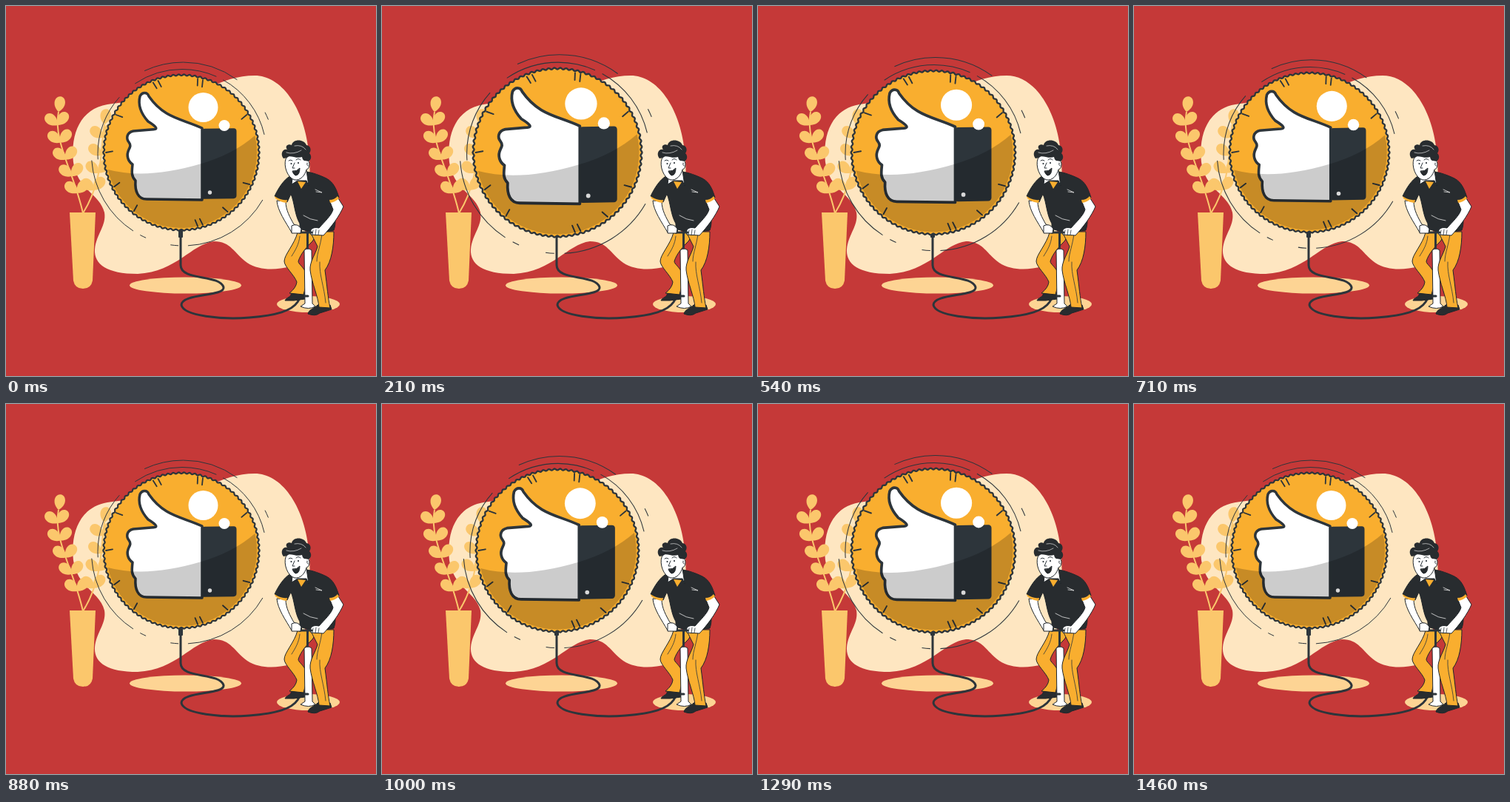
An HTML page that plays this animation: 500x500 px, repeating every 1500 ms.

```html
<!DOCTYPE html>
<html lang="en">
<head>
<meta charset="utf-8">
<title>Inflating balloon</title>
<style>
  html, body { margin: 0; width: 100%; height: 100%; overflow: hidden; background: #c53938; }
  svg { display: block; width: 100vw; height: 100vh; }
  .ink { fill: none; stroke: #2d353b; stroke-linecap: round; stroke-linejoin: round; }
  .ring { fill: none; stroke: #2d353b; }
  .stem { fill: none; stroke: #fbc76c; stroke-width: 2; }
  .part { stroke: #20262a; stroke-linejoin: round; }
  .white { fill: #fff; }
  .dark { fill: #282c2f; }
  .gold { fill: #f9ae2f; }
</style>
</head>
<body>
<svg viewBox="0 0 500 500">
  <path fill="#fee6c1" d="M336 94C372 94 402 136 409 195C414 250 409 325 384 352C365 357 343 358 326 347C308 334 304 318 281 318C250 322 231 359 178 362C136 362 119 349 120 329C122 308 136 297 133 279C127 254 96 248 91 211C87 172 101 139 137 133C181 126 239 129 278 109C294 101 313 94 336 94Z"/>

  <g id="plant" fill="#fbc76c">
    <path d="M86 279H121L117 371Q115 382 104 382Q93 382 91 371Z"/>
    <path class="stem" data-pairs="5" d="M71 143C63 182 92 225 104 280"/>
    <path class="stem" data-pairs="4" d="M133 160C128 190 132 235 104 280"/>
  </g>
  <ellipse cx="242.5" cy="377.5" rx="75.5" ry="11" fill="#fdd494"/>
  <ellipse cx="408.5" cy="403" rx="42.5" ry="11" fill="#fdd494"/>

  <path class="ink" stroke-width="3" d="M236 307V350C236 372 288 362 294 380C296 393 237 388 237 404C240 419 292 424 329 421C366 418 386 412 394 400C399 391 401 392 408 392"/>
  <rect x="233" y="303" width="6" height="10" rx="1" fill="#2d353b"/>

  <g id="balloon">
    <circle class="ring" cx="239.5" cy="200" r="124" pathLength="360" stroke-dasharray="0 30 57 6 5 16 4 5 53 69 61 27 5 22"/>
    <circle class="ring" cx="238" cy="199.5" r="114" pathLength="360" stroke-dasharray="0 176 46 14 58 5 48 13"/>
    <path id="coin" fill="#f9ae2f" stroke="#2d353b" stroke-width="2.2"/>
    <path id="ticks" class="ink" stroke-width="1.8"/>
    <path class="ink" style="fill:#fff" stroke-width="3.5" d="M265 165C237 152 214 152 193 122C191 116 184 116 181 122C178 134 183 146 192 156C205 164 206 167 196 167L172 169C163 171 162 179 166 184C169 188 168 190 166 194C162 202 165 210 171 214C170 224 169 230 175 236C174 250 178 261 190 261L265 262Z"/>
    <rect x="265.5" y="167" width="45" height="93" rx="3" transform="skewY(-1) translate(0 4.5)" fill="#2d353b" stroke="#2d353b" stroke-width="2"/>
    <path id="shade" opacity=".2"/>
    <circle cx="275.5" cy="252" r="2.7" fill="#d8d8d8"/>
    <circle cx="266.5" cy="137" r="20" fill="#fff"/>
    <circle cx="295" cy="161.5" r="7.5" fill="#fff"/>
  </g>

  <g id="legs">
    <path class="part dark" d="M385 388C387 393 378 394 377 398H389L404 396V388Z"/>
    <path class="part gold" d="M394 306C390 322 376 336 376 345C376 352 390 364 393 373Q392 381 383 388L402 390C405 378 408 370 406 362C402 352 395 349 395 345C398 335 406 326 414 318L422 306Z"/>
    <path class="part white" d="M403 330Q408 326 413 330L414 402L418 406Q409 411 398 406L404 402Z"/>
    <path class="ink" stroke-width="3" d="M407.5 305V327M404 392H408"/>
    <path class="part dark" d="M421 404C418 408 409 410 408 416Q418 420 424 415L440 410L438 404Z"/>
    <path class="part gold" d="M411 305H443C443 325 440 345 431 357C434 379 435 394 438 408L423 407C422 393 413 374 411 357C410 346 418 336 421 325Z"/>
    <path class="ink" stroke-width=".8" d="M427 307C426 321 420 334 420 345M424 346C423 363 430 379 432 401M397 311C396 322 391 330 386 338"/>
  </g>

  <g id="torso">
    <path class="part white" d="M366 263C367 277 378 292 386 306L399 307L400 300L389 295C384 286 378 276 378 264Z"/>
    <path class="part dark" d="M388 228C378 231 369 244 363 257Q371 264 380 265L385 254C390 266 390 282 397 294L397 301C413 307 429 306 443 303C448 289 443 275 438 265Q445 264 450 259C447 249 443 238 433 233C425 229 414 225 406 224Z"/>
    <path class="part white" d="M438 265L442 275C440 283 430 292 423 300C414 298 410 302 412 309L429 310C441 297 451 283 456 271L449 260Z"/>
    <path class="gold" d="M363 257Q371 263 380 262L379 266Q370 265 364 260ZM437 262Q444 262 448 257L450 260Q445 265 438 266Z"/>
    <path class="ink" style="stroke:#e8e8e8" stroke-width=".8" d="M418 248L427 252L419 251M402 283Q411 289 421 290"/>
    <path class="part white" d="M388 225L386 241L394 236L406 236L409 243L406 222Z"/>
    <path class="gold" d="M394 237L399 247L405 238Z"/>
    <path class="ink" stroke-width="3" d="M397 306H413"/>
    <path class="part white" d="M386 297Q394 293 399 301L398 307H386Z"/>
    <path class="ink" stroke-width=".8" d="M415 303L414 309M419 302L418 310M423 303L422 309"/>
  </g>

  <g id="head">
    <path class="part white" d="M378 207C375 216 380 232 390 235C398 236 404 229 406 221Q410 220 410 213Q409 207 405 209L402 198L382 199Z"/>
    <path class="dark" d="M375 206C370 200 374 192 380 194C376 189 382 186 386 188C388 179 403 180 406 188C412 189 413 195 410 199C414 203 412 208 409 210L405 209Q401 210 400 204C392 207 383 200 380 205Z"/>
    <path class="ink" style="stroke:#fff" stroke-width=".6" d="M379 198Q389 201 399 195M390 189Q400 187 405 194"/>
    <path class="ink" stroke-width="1" d="M382 209Q384 207 387 209M392 208Q395 205 398 208M390 212L387 219L390 219M407 212Q406 215 408 216"/>
    <path class="ink" stroke-width="2.2" d="M385.500 213v.1M395 212v.1"/>
    <path class="part dark" d="M387 223Q393 224 397 219Q397 229 391 229Q388 227 387 223Z"/>
  </g>
</svg>
<script>
const CX = 237, CY = 198, LOOP = 1500, FPS = 24;
const $ = id => document.getElementById(id);
const at = (r, deg) => {
  const a = deg * Math.PI / 180;
  return (CX + r * Math.cos(a)).toFixed(2) + ' ' + (CY + r * Math.sin(a)).toFixed(2);
};

// Scalloped rim
const SCALLOPS = 90;
const rim = Array.from({ length: SCALLOPS * 8 }, (_, i) =>
  at(104.8 + 0.9 * Math.cos(i * Math.PI / 4), i * 45 / SCALLOPS));
$('coin').setAttribute('d', `M${rim.join('L')}Z`);
$('shade').setAttribute('d',
  `M${at(102, 167)}Q190 235 264 213Q308 200 ${at(102, -13)}A102 102 0 0 1 ${at(102, 167)}Z`);

// Creases along the rim: single ones, and pairs near top and bottom
const tick = deg => `M${at(102, deg)}L${at(93, deg + 1)}`;
const singles = [-30, 25, 52, 129, 153, 180, 210];
const pairs = [-75.5, 75.5, -110].flatMap(deg => [deg - 2, deg + 2]);
$('ticks').setAttribute('d', [...singles, ...pairs].map(tick).join(''));

// One leaf on the tip of each stem, the others in pairs down the stem
const leaf = ({ x, y }, tilt) =>
  `<path d="M0 0C-11-8-8-21 0-21C8-21 11-8 0 0Z" transform="translate(${x} ${y}) rotate(${tilt})"/>`;
let leaves = '';
for (const stem of document.querySelectorAll('.stem')) {
  leaves += leaf(stem.getPointAtLength(0), 8);
  for (let i = 0; i < stem.dataset.pairs; i++) {
    const joint = stem.getPointAtLength(18 + 24 * i);
    leaves += leaf(joint, -50) + leaf(joint, 38);
  }
}
$('plant').insertAdjacentHTML('beforeend', leaves);

// Two linear beats, each swelling by a tenth: start, peak and end in ms
const swell = (t, start, peak, end) =>
  Math.max(0, Math.min((t - start) / (peak - start), (end - t) / (end - peak)));
const scaleAt = t => 1 + 0.1 * (swell(t, 0, 250, 875) + swell(t, 875, 1150, 1458));

const start = performance.now();
function draw() {
  const t = (performance.now() - start) % LOOP;
  const step = Math.floor((t + 3) * FPS / 1000) % (LOOP * FPS / 1000);
  const s = scaleAt(step * 1000 / FPS);
  $('balloon').setAttribute('transform', `translate(${CX} ${CY}) scale(${s}) translate(${-CX} ${-CY})`);
  requestAnimationFrame(draw);
}
draw();
</script>
</body>
</html>
```
